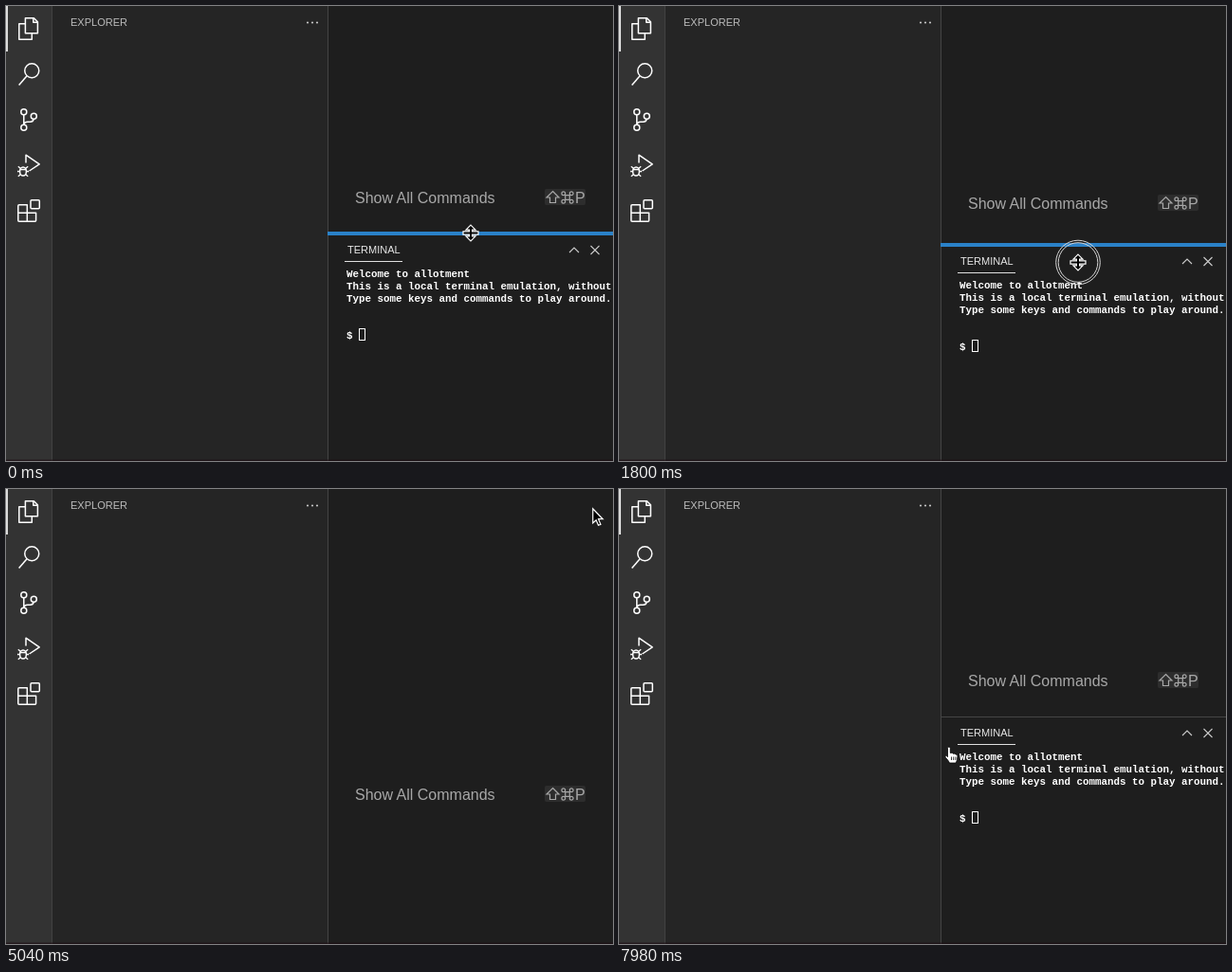
Recreate the animation shown at these times as an HTML page. Size 640 px wide and 480 px high, loop 8 s.

```html
<!DOCTYPE html>
<html lang="en">
<head>
<meta charset="utf-8">
<title>Split panes</title>
<style>
  html, body { margin: 0; width: 100%; height: 100%; overflow: hidden; background: #1e1e1e; }
  svg { display: block; width: 100vw; height: 100vh; }
  text { font-family: "Liberation Sans", Arial, sans-serif; white-space: pre; }
  .label { font-size: 11px; fill: #bbb; }
  .hint { font-size: 16px; fill: #a8a8a8; }
  .term text { font: bold 10.83px "Liberation Mono", "Courier New", monospace; fill: #fff; }
  .line { fill: none; stroke: #fff; stroke-width: 1.5; stroke-linejoin: round; }
  .thin { fill: none; stroke: #ccc; stroke-width: 1.1; }
  .keys { fill: none; stroke: #a8a8a8; stroke-width: 1.2; }
  .dark { fill: #000; stroke: #fff; stroke-width: 1.2; }
  .ring { fill: none; stroke: #d4d4d4; stroke-width: 1; }
</style>
</head>
<body>
<svg viewBox="0 0 640 480">
  <rect width="640" height="480" fill="#1e1e1e"/>

  <g id="editor">
    <text class="hint" x="368" y="6">Show All Commands</text>
    <rect x="568" y="-9" width="43" height="17" rx="2" fill="#2d2d2d"/>
    <path class="keys" transform="translate(576.5 0)" d="M0-6.5L6.5 0H3V5.5H-3V0H-6.5z"/>
    <g class="keys" transform="translate(592 0)">
      <path d="M-2.3-2.3h4.6v4.6h-4.6z"/>
      <circle cx="-4.2" cy="-4.2" r="1.9"/><circle cx="4.2" cy="-4.2" r="1.9"/>
      <circle cx="-4.2" cy="4.2" r="1.9"/><circle cx="4.2" cy="4.2" r="1.9"/>
    </g>
    <text class="hint" x="600" y="6">P</text>
  </g>

  <g id="terminal" class="term">
    <rect x="339" width="301" height="480" fill="#1e1e1e"/>
    <rect x="339" width="301" height="1" fill="#454545"/>
    <text x="360" y="21" style="font:11px 'Liberation Sans',Arial,sans-serif;fill:#e7e7e7">TERMINAL</text>
    <rect x="357" y="29" width="61" height="1" fill="#e0e0e0"/>
    <path id="chevron" class="thin" d="M-5 2.5L0-2.5 5 2.5"/>
    <path class="thin" d="M616.5 13l9 9m0-9l-9 9"/>
    <text x="359" y="46">Welcome to allotment</text>
    <text x="359" y="59">This is a local terminal emulation, without</text>
    <text x="359" y="72">Type some keys and commands to play around.</text>
    <text x="359" y="111">$</text>
    <rect x="372.5" y="100.5" width="6" height="12" fill="none" stroke="#fff"/>
  </g>

  <rect x="48" width="291" height="480" fill="#252525"/>
  <rect x="339" width="1" height="480" fill="#444"/>
  <rect id="sash" x="339" width="301" height="4" fill="#2a81c8"/>
  <text class="label" x="68" y="21">EXPLORER</text>
  <g fill="#c5c5c5">
    <circle cx="318" cy="17.5" r="1.1"/><circle cx="323" cy="17.5" r="1.1"/><circle cx="328" cy="17.5" r="1.1"/>
  </g>

  <rect width="48" height="480" fill="#333"/>
  <rect x="48" width="1" height="480" fill="#414141"/>
  <rect width="2" height="48" fill="#dcdcdc"/>
  <g class="line">
    <path transform="translate(12 12)" d="M8.4.8h9l4 4v12h-13zM16.8.8v4.4h4.4M7.7 6.8H1.8v16.4h13.5v-6"/>
    <g transform="translate(12 60)">
      <circle cx="15.25" cy="8.25" r="7.5"/><path d="M9.8 14L1.6 23.4"/>
    </g>
    <g transform="translate(12 108)">
      <circle cx="6.8" cy="3.7" r="3"/><circle cx="6.8" cy="20.2" r="3"/><circle cx="17.3" cy="8.2" r="3"/>
      <path d="M6.8 6.7v10.5M17.3 11.2q-.8 3-3.7 3h-3q-3.2 0-3.8 3"/>
    </g>
    <g transform="translate(12 156)">
      <path d="M9 9.5V1.2L23.2 10.8 12.5 18"/>
      <ellipse cx="6" cy="18.5" rx="3.4" ry="4.6"/>
      <path stroke-width="1.3" d="M2.8 16.5h6.4M0 18.5h2.6m6.8 0H12M.8 13.3l2.4 2m8-2l-2.4 2M.8 23.7l2.4-2m8 2l-2.4-2"/>
    </g>
    <g transform="translate(12 204)">
      <path d="M10.3 14.2V5.8H1.8q-1 0-1 1V22.2q0 1 1 1H18.6q1 0 1-1v-8H.8m9.5 0v9"/>
      <rect x="14" y=".8" width="9.3" height="9" rx="1"/>
    </g>
  </g>
  <rect y="478.5" width="640" height="1.5" fill="#1c0b12" opacity=".6"/>

  <g id="pointer">
    <g id="ring" class="ring"><circle r="23.3"/><circle r="20.8"/></g>
    <path id="resize" class="dark" d="M0-8.3L5-3.3H1.6V-1.6H8V1.6H1.6V3.3H5L0 8.3-5 3.3H-1.6V1.6H-8V-1.6H-1.6V-3.3H-5z"/>
    <path id="arrow" class="dark" d="M.5.5V15.5L3.9 12.4 6.3 18 8.7 17 6.3 11.4H11z"/>
    <g id="hand" stroke="#000" stroke-width=".8">
      <path fill="#fff" d="M-1.5 8V-.5a1.4 1.4 0 0 1 2.8 0V4.5q2.4-.8 2.8.7 2.4-.6 2.7.8 2.2-.3 2.2 1.8 0 4-1.8 7.2H.5q-1-2.5-4-5.5-1.4-1.8.2-2.2 1 0 1.8 1.4z"/>
      <path d="M2.5 8.5v3.5m2.2-3.5v3.5m2.2-3.5v3.5"/>
    </g>
  </g>
</svg>
<script>
const LOOP = 8000, STEP = 30, LAG = 50;
const $ = id => document.getElementById(id);

// Pointer hotspot: time, x, y
const path = [
  [0, 490, 239.5], [570, 490, 239.5], [1020, 490, 163.5], [1380, 487, 103], [1420, 487, 103],
  [1800, 484, 270.5], [2130, 483, 344.5], [2400, 483, 344.5], [3120, 592, 359], [3810, 592, 359],
  [3840, 597, 356], [4200, 622, 9], [4380, 619, 18], [5010, 619, 18], [5730, 475, 477],
  [6260, 475, 477], [6840, 465, 319.5], [7830, 465, 319.5], [7980, 348, 274], [8000, 348, 274]
];
const pointers = [[2460, 'resize'], [3090, 'arrow'], [3840, 'hand'], [4320, 'arrow'],
  [4800, 'hand'], [5700, 'arrow'], [7860, 'resize'], [LOOP, 'hand']];
const presses = [[360, 2190], [3420, 3600], [4740, 4830], [6030, 7080], [7380, 7440], [7500, 7590]];

const clamp = v => Math.max(0, Math.min(1, v));
const ramp = (t, from, to) => clamp((t - from) / (to - from));
const slope = (i, k) => i < 0 || i > path.length - 2 ? 0
  : (path[i + 1][k] - path[i][k]) / (path[i + 1][0] - path[i][0]);

// Tangent that never overshoots a key
function tangent(i, k) {
  const a = slope(i - 1, k), b = slope(i, k);
  return a * b > 0 ? 2 * a * b / (a + b) : 0;
}

function along(t, k) {
  t = Math.max(0, t);
  const i = Math.max(0, path.findIndex(p => p[0] > t) - 1);
  const h = path[i + 1][0] - path[i][0], u = (t - path[i][0]) / h, v = 1 - u;
  return path[i][k] * v * v * (1 + 2 * u) + path[i + 1][k] * u * u * (3 - 2 * u)
    + h * u * v * (v * tangent(i, k) - u * tangent(i + 1, k));
}

function splitAt(t) {
  const dragged = Math.round(along(t - LAG, 2) + 0.5);
  if (t < 2400) return dragged;
  if (t < 3510) return 345;
  if (t < 4770) return 0;
  if (t < 6270) return 480;
  if (t < 7590) return dragged > 441 ? 480 : Math.min(402, dragged);
  return 240;
}

function sashGlow(t) {
  if (t < 3000) return 1 - ramp(t, 2520, 2640);
  return ramp(t, 5880, 6000) * (1 - ramp(t, 7560, 7650));
}

function draw(t) {
  const split = splitAt(t);
  $('editor').setAttribute('transform', `translate(0 ${202 + (split - 240) / 2})`);
  $('terminal').setAttribute('transform', `translate(0 ${split})`);
  $('chevron').setAttribute('transform', `translate(599 17.5) scale(1 ${split ? 1 : -1})`);
  $('sash').setAttribute('y', split - 2);
  $('sash').setAttribute('opacity', sashGlow(t));

  $('pointer').setAttribute('transform', `translate(${along(t, 1)} ${along(t, 2)})`);
  const shape = pointers.find(p => t < p[0])[1];
  for (const id of ['resize', 'arrow', 'hand']) $(id).style.display = id === shape ? '' : 'none';
  const pressed = presses.some(([from, to]) => t >= from && t < to);
  $('ring').style.display = pressed ? '' : 'none';
  const small = t > 6000 && t < 7000;
  $('ring').setAttribute('transform', `scale(${small ? 0.84 + 0.16 * ramp(t, 6270, 6390) : 1})`);
}

const start = performance.now();
function tick() {
  const t = (performance.now() - start) % LOOP;
  draw(Math.floor(t / STEP) * STEP);
  requestAnimationFrame(tick);
}
draw(0);
requestAnimationFrame(tick);
</script>
</body>
</html>
```
